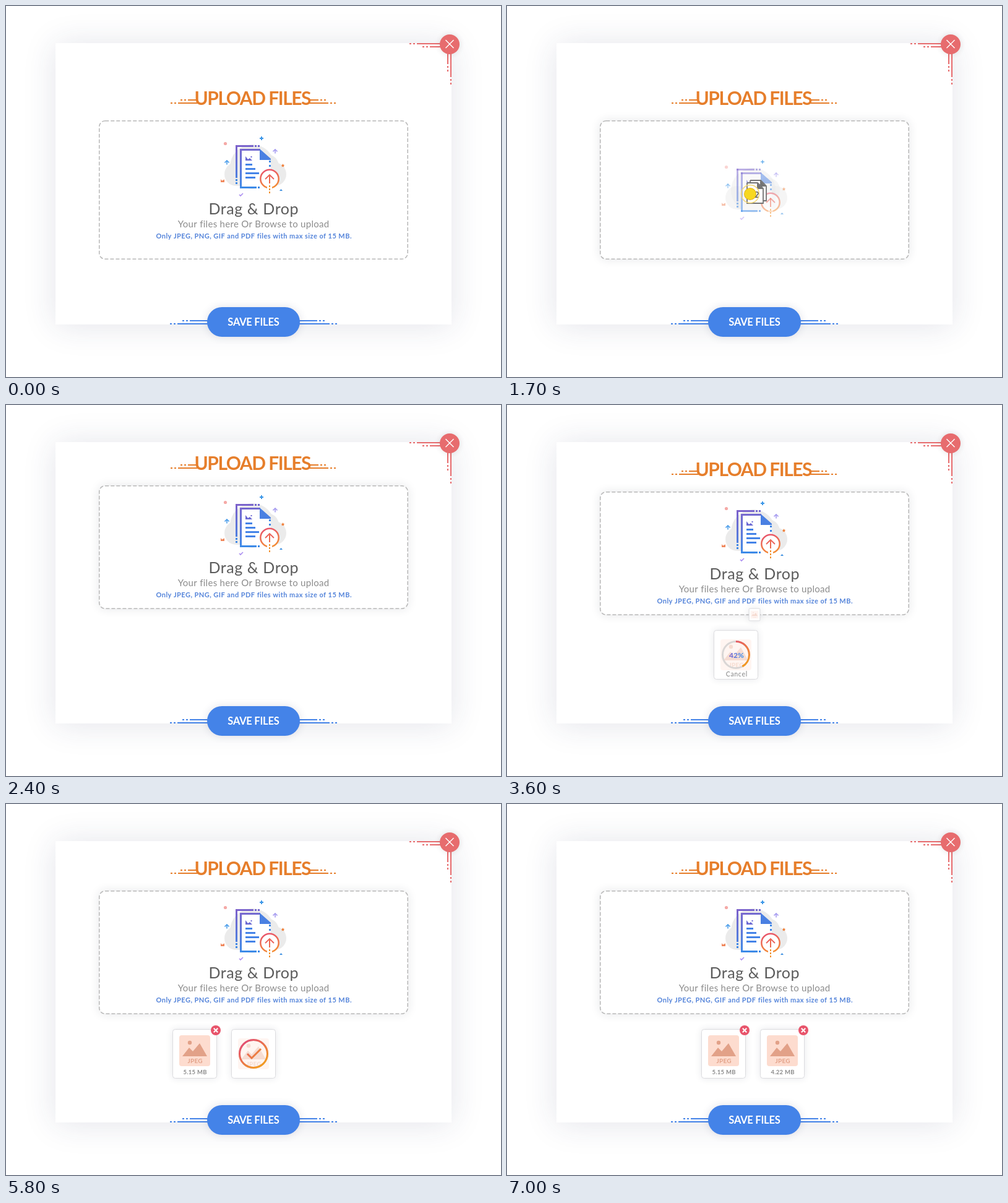
Write an HTML page with a canvas that moves like this. It is 800 px wide and 600 px high and loops after 8000 ms.

```html
<!DOCTYPE html>
<html lang="en">
<head>
<meta charset="utf-8">
<title>Upload files</title>
<style>
html, body { margin: 0; width: 100%; height: 100%; overflow: hidden; background: #fff; }
canvas { display: block; width: 800px; height: 600px; }
</style>
</head>
<body>
<canvas id="stage" width="800" height="600"></canvas>
<script>
const ctx = document.getElementById('stage').getContext('2d');
const LOOP = 8000, STEP = 100;
const HOLDS = [18, 39, 49, 57];
const FONT = 'Lato, "Open Sans", sans-serif';
const BLUE = '#4483e8', RED = '#e76c6e', ORANGE = '#e67e2b';

const clamp = v => Math.max(0, Math.min(1, v));
const span = (t, a, b) => clamp((t - a) / (b - a));
const smooth = (t, a, b) => { const u = span(t, a, b); return u * u * (3 - 2 * u); };
const mix = (a, b, u) => a + (b - a) * u;

function group(draw, { x = 0, y = 0, scale = 1, alpha = 1 }) {
  if (alpha <= 0 || scale <= 0) return;
  ctx.save();
  ctx.translate(x, y);
  ctx.scale(scale, scale);
  ctx.globalAlpha *= alpha;
  draw();
  ctx.restore();
}

function gradient(x0, y0, x1, y1, from, to) {
  const g = ctx.createLinearGradient(x0, y0, x1, y1);
  g.addColorStop(0, from);
  g.addColorStop(1, to);
  return g;
}

function rect(x, y, w, h, color) {
  ctx.fillStyle = color;
  ctx.fillRect(x, y, w, h);
}

function disc(x, y, r, color) {
  ctx.beginPath();
  ctx.arc(x, y, r, 0, Math.PI * 2);
  ctx.fillStyle = color;
  ctx.fill();
}

function arc(x, y, r, part, color, width) {
  ctx.beginPath();
  ctx.arc(x, y, r, -Math.PI / 2, -Math.PI / 2 + Math.PI * 2 * part);
  ctx.strokeStyle = color;
  ctx.lineWidth = width;
  ctx.stroke();
}

function trace(points) {
  ctx.beginPath();
  for (let i = 0; i < points.length; i += 2) ctx.lineTo(points[i], points[i + 1]);
}

function line(points, color, width) {
  trace(points);
  ctx.strokeStyle = color;
  ctx.lineWidth = width;
  ctx.stroke();
}

function shape(points, color) {
  trace(points);
  ctx.closePath();
  ctx.fillStyle = color;
  ctx.fill();
}

function cross(x, y, r, color, width) {
  line([x - r, y - r, x + r, y + r], color, width);
  line([x + r, y - r, x - r, y + r], color, width);
}

function text(str, x, y, size, weight, color, spacing = 0) {
  ctx.font = `${weight} ${size}px ${FONT}`;
  ctx.letterSpacing = spacing + 'px';
  ctx.textAlign = 'center';
  ctx.fillStyle = color;
  ctx.fillText(str, x + spacing / 2, y);
}

function withShadow(color, blur, dy, draw) {
  ctx.save();
  ctx.shadowColor = color;
  ctx.shadowBlur = blur;
  ctx.shadowOffsetY = dy;
  draw();
  ctx.restore();
}

function rounded(x, y, w, h, r) {
  ctx.beginPath();
  ctx.roundRect(x, y, w, h, r);
}

// A bar that breaks into two dots; dir is the way it points.
function tail(start, end, y, dir, color) {
  const bar = (a, b) => rect(Math.min(a, b), y, Math.abs(b - a), 2, color);
  bar(start, end);
  bar(end + dir * 3, end + dir * 6);
  bar(end + dir * 9, end + dir * 12);
}

function drawPanel() {
  withShadow('rgba(40,50,90,.13)', 50, 2, () => rect(80, 60, 640, 455, '#fff'));
  tail(703, 664, 60, -1, RED);
  tail(703, 685, 65, -1, RED);
  ctx.save();
  ctx.transform(0, 1, 1, 0, 0, 0);
  tail(76, 115, 718, 1, RED);
  tail(76, 94, 713, 1, RED);
  ctx.restore();
  withShadow('rgba(60,40,40,.14)', 10, 0, () => disc(717, 62, 16, RED));
  cross(717, 61.5, 6.5, '#fff', 1.5);

  tail(328, 297, 508, -1, BLUE);
  tail(328, 277, 513, -1, BLUE);
  tail(472, 503, 508, 1, BLUE);
  tail(472, 523, 513, 1, BLUE);
  withShadow('rgba(40,50,90,.14)', 14, 0, () => {
    rounded(325, 487, 150, 48, 24);
    ctx.fillStyle = BLUE;
    ctx.fill();
  });
  text('SAVE FILES', 400, 517, 16.5, 'bold', '#fff', -0.25);
}

function drawTitle() {
  tail(308, 294, 151, -1, ORANGE);
  tail(311, 278, 156, -1, ORANGE);
  tail(490, 505, 151, 1, ORANGE);
  tail(488, 521, 156, 1, ORANGE);
  text('UPLOAD FILES', 399, 160, 30, 'bold', ORANGE, -1.5);
}

function drawZone(y, h, glow) {
  if (glow > 0) withShadow(`rgba(40,50,60,${0.13 * glow})`, 16, 0, () => {
    rounded(151, y + 1, 498, h - 2, 9);
    ctx.fillStyle = '#fff';
    ctx.fill();
  });
  rounded(150.75, y + 0.75, 498.5, h - 1.5, 9.5);
  ctx.setLineDash([6, 3]);
  ctx.strokeStyle = '#b8b8b8';
  ctx.lineWidth = 1.5;
  ctx.stroke();
  ctx.setLineDash([]);
}

function upArrow(x, y, color) {
  line([x, y, x, y + 7], color, 1.6);
  line([x - 3.5, y + 3.8, x, y + 0.5, x + 3.5, y + 3.8], color, 1.6);
}

function drawPicture() {
  const ink = gradient(372, 226, 385, 295, '#7d62cb', '#3c8ae8');
  const warm = gradient(420, 264, 430, 300, '#e8526c', '#f5982a');

  for (const [x, y, r] of [[398, 260, 36], [422, 259, 19], [434, 272, 19], [372, 272, 19]])
    disc(x, y, r, '#ebebeb');
  rect(372, 262, 62, 29, '#ebebeb');

  rect(371, 225, 3, 53, ink);
  rect(371, 225, 29, 3, ink);
  for (const x of [402, 407]) rect(x, 225, 3, 3, '#7466d0');
  for (const y of [280, 285]) rect(371, y, 3, 3, '#3f88e6');

  shape([378, 231, 411, 231, 428, 249, 428, 295, 378, 295], '#fff');
  rect(378, 231, 3, 64, ink);
  rect(378, 231, 33, 3, ink);
  rect(378, 292, 27, 3, '#3c8ae8');
  rect(407, 292, 3, 3, '#3c8ae8');
  shape([410, 231, 428, 247, 428, 249, 410, 249], '#4a80e2');
  for (const y of [250, 257]) rect(425, y, 3, 3, '#3f88e6');

  shape([387, 243, 391, 248, 394, 246, 398, 250, 387, 250], '#6b69d3');
  rect(395.5, 243, 2, 2, '#6b69d3');
  [11, 16, 22, 16].forEach((w, i) => rect(387, 255 + i * 7, w, 3, BLUE));

  disc(426, 279.5, 15, '#fff');
  arc(426, 279.5, 14.7, 1, warm, 2.5);
  rect(422, 291, 8, 6, '#fff');
  line([419, 280, 426, 273, 433, 280], '#eb6058', 1.8);
  rect(425, 273, 2, 14, '#ec6a50');
  for (const y of [290, 295, 300]) rect(425, y, 2, 3, '#f2922f');

  disc(354.5, 222.5, 2.6, '#f5a9a6');
  rect(410, 213, 6, 2, '#3c97e8');
  rect(412, 211, 2, 6, '#3c97e8');
  upArrow(435, 231.5, '#a59bf0');
  upArrow(357, 249.5, '#4b9dea');
  shape([447.5, 255, 448.5, 257, 450, 257.2, 449, 258.7, 449.3, 260.5, 447.5, 259.6,
    445.7, 260.5, 446, 258.7, 445, 257.2, 446.5, 257], '#f0813c');
  shape([347, 280, 349, 282.5, 351, 281.5, 353, 280.5, 353, 285, 347, 285], '#f0885c');
  shape([442, 299, 444.5, 296, 447, 299], '#3c8fe0');
  line([377, 305, 379, 307, 383, 303], '#ab8ef0', 1.6);
}

function drawPrompt() {
  text('Drag & Drop', 400, 336.5, 25, '400', '#5c5c5c', 0.6);
  text('Your files here Or Browse to upload', 400, 358, 15, '400', '#8c8c8c', 0.3);
  text('Only JPEG, PNG, GIF and PDF files with max size of 15 MB.', 400.5, 376, 11, 'bold', '#5484da', 0.45);
}

function page(x, y) {
  const p = [x, y, x + 17, y, x + 26, y + 9, x + 26, y + 33, x, y + 33];
  shape(p, '#fff');
  line([...p, x, y], '#747474', 1.8);
  shape([x + 16, y, x + 26, y + 10, x + 16, y + 10], '#747474');
}

// The dragged pair of files with the pointer highlight.
function drawDragged(ripple) {
  page(393, 282);
  page(388, 286);
  text('2', 403.5, 310, 14, 'bold', '#555');
  disc(393, 304, 10, '#e0b21c');
  disc(393, 304, 9, '#f7d81f');
  if (ripple > 0) arc(393, 304, 14.5 * ripple, 1, '#f3d774', 1.5);
}

function drawThumb() {
  rounded(-25, -25, 50, 50, 4);
  ctx.fillStyle = '#fddccf';
  ctx.fill();
  disc(-8, -13, 3.2, '#e2a188');
  shape([-20, 9, -9, -5, -3, 1, 8, -12, 20, 9], '#e2a188');
  text('JPEG', 0.5, 20, 10, 'bold', '#e2a188', 0.2);
}

function drawRing(done, percent, checked, warmth) {
  const warm = gradient(-14, -18, 14, 18, '#e5506f', '#f39a20');
  const cool = gradient(-12, 0, 12, 0, '#7a5fd0', '#3290ee');
  const r = 21.5 + warmth;
  arc(0, 0, r, 1, '#d9d6d5', 3);
  arc(0, 0, r, percent / 100, warm, 3);
  if (!done) return text(Math.round(percent) + '%', 1, 5, 12, 'bold', cool);
  const tick = [-10, 0, -3, 7, 12, -8];
  group(() => line(tick, gradient(-10, 0, 12, 0, '#5a68d8', '#4483e8'), 3), { alpha: checked * (1 - warmth) });
  group(() => line(tick, gradient(-10, -8, 12, 8, '#e8685a', '#ee8a30'), 3), { alpha: warmth });
}

const cards = [
  { born: 2700, start: 3021, done: 4400, warm: [4500, 4800], restore: [4800, 5400], size: '5.15 MB',
    x: t => 400 - 95 * smooth(t, 3480, 3800) },
  { born: 3600, start: 4150, done: 5400, warm: [5600, 5800], restore: [5800, 6400], size: '4.22 MB',
    x: () => 400 },
];

function drawCard(card, t) {
  if (t < card.born) return;
  const grow = smooth(t, card.born, card.born + 200);
  const scale = mix(0.25, 1, grow);
  const restore = smooth(t, ...card.restore);
  const percent = 100 * span(t, card.start, card.done);
  const done = t >= card.done;
  const ready = span(t, card.born + 200, card.born + 400);

  group(() => {
    withShadow('rgba(40,50,70,.12)', 12, 0, () => {
      rounded(-35.5, -39.5, 71, 79, 4);
      ctx.fillStyle = '#fff';
      ctx.fill();
    });
    ctx.strokeStyle = '#dcdcdf';
    ctx.lineWidth = 1 / scale;
    ctx.stroke();
    group(drawThumb, { y: -5 * restore, alpha: mix(0.3, 1, restore) });
    group(() => drawRing(done, percent, span(t, card.done - 100, card.done + 100), span(t, ...card.warm)),
      { alpha: ready * clamp(1 - restore * 1.6) });
    if (!done) group(() => text('Cancel', 1, 35, 10.5, '400', '#858585', 0.7), { alpha: ready });
    group(() => text(card.size, 0.5, 32.5, 9.5, 'bold', '#8a8a8a', 0.3), { alpha: restore });
    group(() => {
      disc(0, 0, 8, '#e8546b');
      cross(0, 0, 3.2, '#fff', 2);
    }, { x: 34, y: -38, scale: restore });
  }, { x: card.x(t) + 45 * smooth(t, 6560, 7000), y: mix(339, 404, grow), scale });
}

function render(t) {
  ctx.fillStyle = '#fff';
  ctx.fillRect(0, 0, 800, 600);

  const lift = t >= 2500 ? -45 : -55 * smooth(t, 1850, 2400);
  const settle = smooth(t, 1850, 2400);
  const hover = smooth(t, 1150, 1600);
  const dim = hover * (1 - settle);

  drawPanel();
  group(drawTitle, { y: lift });
  drawZone(185 + lift, mix(225, 200, settle), hover);

  const contentY = lift - 10 * settle + 38 * dim;
  group(drawPicture, { y: contentY, alpha: 1 - 0.5 * dim });
  group(drawPrompt, { y: contentY, alpha: 1 - dim });

  if (t >= 1000 && t < 2100) {
    const away = 1 - smooth(t, 900, 1700);
    group(() => drawDragged(span(t, 1500, 1700)),
      { x: 385 * away, y: 155 * away, alpha: 1 - span(t, 1800, 2100) });
  }
  cards.forEach(card => drawCard(card, t));
}

function tick(now) {
  let step = Math.floor((now % LOOP) / STEP);
  if (HOLDS.includes(step)) step--;
  render(step * STEP);
  requestAnimationFrame(tick);
}
requestAnimationFrame(tick);
</script>
</body>
</html>
```
